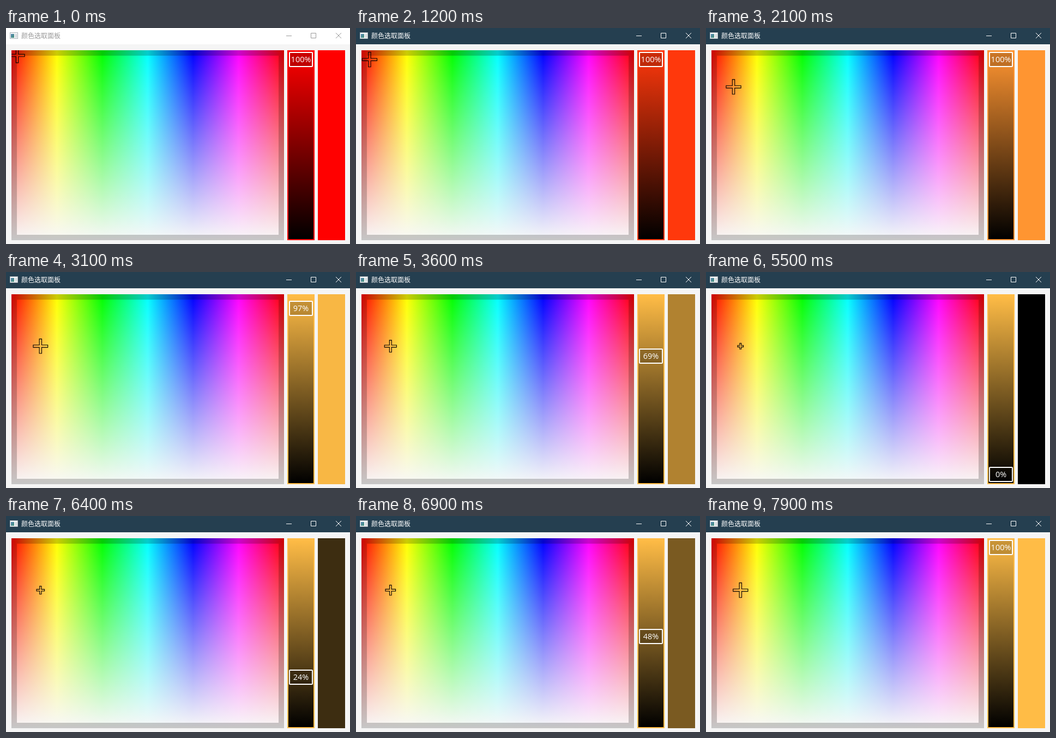
An HTML page that plays this animation: 631x398 px, repeating every 8 s.

```html
<!DOCTYPE html>
<html lang="zh">
<head>
<meta charset="utf-8">
<title>颜色选取面板</title>
<style>
  html, body { margin: 0; width: 100%; height: 100%; overflow: hidden; background: #f5f5f5; }
  svg { display: block; }
  #title { font: 12px "Noto Sans CJK SC", "Noto Sans CJK", sans-serif; }
  #label { font: 14.5px "Open Sans", "Noto Sans", sans-serif; fill: #fff; text-anchor: middle; }
</style>
</head>
<body>
<svg width="631" height="398" viewBox="0 0 631 398">
  <defs>
    <linearGradient id="hues">
      <stop offset="0" stop-color="#f00"/>
      <stop offset=".16667" stop-color="#ff0"/>
      <stop offset=".33333" stop-color="#0f0"/>
      <stop offset=".5" stop-color="#0ff"/>
      <stop offset=".66667" stop-color="#00f"/>
      <stop offset=".83333" stop-color="#f0f"/>
      <stop offset="1" stop-color="#f00"/>
    </linearGradient>
    <linearGradient id="fade" x2="0" y2="1">
      <stop offset="0" stop-color="#f8f8f8" stop-opacity="0"/>
      <stop offset="1" stop-color="#f8f8f8"/>
    </linearGradient>
    <linearGradient id="shade" x2="0" y2="1">
      <stop id="shadeTop" offset="0"/>
      <stop offset="1" stop-color="#000"/>
    </linearGradient>
    <linearGradient id="pane" x2="1" y2="1">
      <stop offset="0" stop-color="#4b7fb0"/>
      <stop offset="1" stop-color="#4f9a7c"/>
    </linearGradient>
    <clipPath id="panel"><rect x="10" y="41" width="500" height="350"/></clipPath>
  </defs>

  <rect width="631" height="398" fill="#f5f5f5"/>
  <rect id="bar" width="631" height="30"/>
  <g shape-rendering="crispEdges">
    <rect x="7" y="8" width="15" height="12" fill="#a9b2b8"/>
    <rect x="8" y="9" width="13" height="10" fill="#f4f6f7"/>
    <rect x="9" y="11" width="6" height="7" fill="url(#pane)"/>
    <rect x="17" y="11" width="3" height="7" fill="#d3d8dc"/>
  </g>
  <text id="title" x="28" y="19">颜色选取面板</text>
  <path id="buttons" fill="none" d="M514 14.5h10M559.5 9.5h9v9h-9zM605 9l10 10M615 9l-10 10"/>

  <g clip-path="url(#panel)">
    <rect x="10" y="41" width="500" height="350" fill="url(#hues)"/>
    <rect x="10" y="41" width="500" height="350" fill="url(#fade)"/>
    <rect x="15" y="46" width="490" height="340" fill="none" stroke="#000" stroke-opacity=".2" stroke-width="10"/>
    <path id="cross" fill="none" stroke="#000" stroke-width="1.1"/>
  </g>

  <rect id="frame" x="516" y="41" width="50" height="350"/>
  <rect x="518" y="43" width="46" height="346" fill="url(#shade)"/>
  <g id="handle">
    <rect x="520" y="1" width="42" height="26" rx="1" fill="#000" fill-opacity=".2" stroke="#fff" stroke-width="2"/>
    <text id="label" x="541" y="19"></text>
  </g>
  <rect id="swatch" x="572" y="41" width="50" height="350"/>
</svg>
<script>
const $ = id => document.getElementById(id);
const LOOP = 8000, TICK = 100;
const clamp = n => Math.min(1, Math.max(0, n));
const linear = u => u;
const smooth = u => u * u * (3 - 2 * u);
const rush = u => u ** 1.7;

// Each move: start time, end time, target, easing.
const pointerMoves = [
  [1000, 1600, [37.6, 80], smooth],
  [1700, 2300, [63.3, 136.7], rush]
];
const valueMoves = [
  [2920, 4500, [0.225], smooth],
  [4900, 5500, [0], linear],
  [5900, 7400, [0.72], linear],
  [7600, 7900, [1], linear]
];

function follow(from, moves, t) {
  let at = from;
  for (const [start, end, to, ease] of moves) {
    const k = ease(clamp((t - start) / (end - start)));
    at = at.map((a, i) => a + (to[i] - a) * k);
  }
  return at;
}

// Colour of the panel at a point, as [r, g, b].
function pick(x, y) {
  const hue = (x - 10) / 500 * 6, white = (y - 41) / 350;
  return [0, 4, 2].map(shift => {
    const pure = clamp(Math.abs((hue + shift) % 6 - 3) - 1);
    return 255 * (pure + (1 - pure) * white);
  });
}

const rgb = (c, v = 1) => `rgb(${c.map(n => Math.round(n * v)).join()})`;

function crossPath(x, y, v) {
  const r = 5.3 + 8.3 * v, a = 1.4 + 0.8 * v, b = r - a;
  return `M${x - a} ${y - r}h${2 * a}v${b}h${b}v${2 * a}h${-b}v${b}h${-2 * a}v${-b}h${-b}v${-2 * a}h${b}z`;
}

function draw(t) {
  const active = t >= 1100;
  const [x, y] = follow([20.5, 50.5], pointerMoves, t);
  const [v] = follow([1], valueMoves, t);
  const color = active ? pick(x, y) : [255, 0, 0];
  const ink = active ? "#fff" : "#999";

  $("bar").setAttribute("fill", active ? "#253f50" : "#fff");
  $("title").setAttribute("fill", ink);
  $("buttons").setAttribute("stroke", ink);
  $("cross").setAttribute("d", crossPath(x, y, v));
  $("frame").setAttribute("fill", rgb(color));
  $("shadeTop").setAttribute("stop-color", rgb(color));
  $("swatch").setAttribute("fill", rgb(color, v));
  $("handle").setAttribute("transform", `translate(0 ${Math.round(44 + 315 * (1 - v))})`);
  $("label").textContent = Math.floor(v * 100 + 1e-6) + "%";
}

const begin = performance.now();
function loop() {
  const t = (performance.now() - begin) % LOOP;
  draw(Math.floor(t / TICK) * TICK);
  requestAnimationFrame(loop);
}
loop();
</script>
</body>
</html>
```
